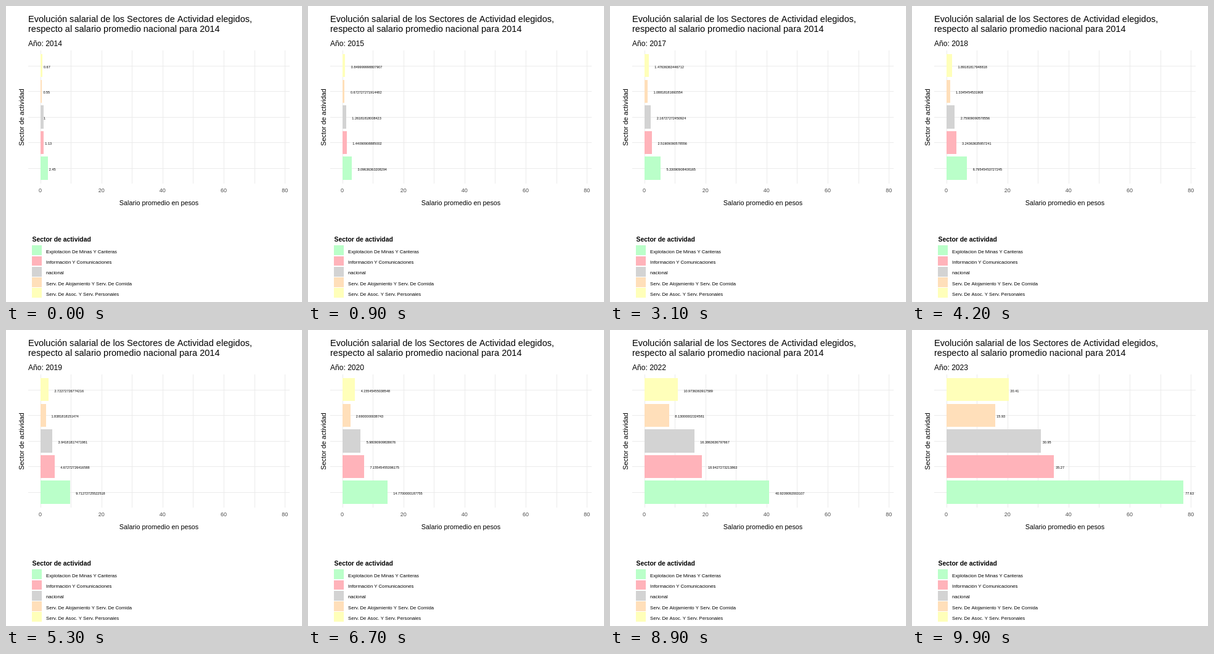
These frames come from a looping animation (480 px wide and 480 px high, 10 s). An HTML page with a canvas:

```html
<!DOCTYPE html>
<html lang="es">
<head>
<meta charset="utf-8">
<style>
html, body { margin: 0; width: 100%; height: 100%; overflow: hidden; background: #fff; }
canvas { display: block; }
</style>
</head>
<body>
<canvas id="stage" width="480" height="480"></canvas>
<script>
const ctx = document.getElementById('stage').getContext('2d');
const FONT = '"Liberation Sans", Arial, sans-serif';
const STEPS = 11, FRAME_MS = 100, FRAMES = 100, FIRST_YEAR = 2014;
const PANEL = { left: 36, top: 72, width: 424, height: 216 };
const ROW = PANEL.height / 5.2;

// National wage index by year; sectors follow it through their pay in three key years
const national = [1, 1.32, 1.75, 2.26, 2.87, 4.18, 5.73, 8.49, 14.93, 30.95];
const MID = 6, LAST = national.length - 1;
const sectors = [
  { name: 'Explotacion De Minas Y Canteras', color: '#baffc9', first: 2.45, mid: 14.14, last: 77.63 },
  { name: 'Información Y Comunicaciones', color: '#ffb3ba', first: 1.13, mid: 6.87, last: 35.27 },
  { name: 'nacional', color: '#d3d3d3', first: national[0], mid: national[MID], last: national[LAST] },
  { name: 'Serv. De Alojamiento Y Serv. De Comida', color: '#ffdfba', first: 0.55, mid: 2.56, last: 15.93 },
  { name: 'Serv. De Asoc. Y Serv. Personales', color: '#ffffba', first: 0.67, mid: 3.99, last: 20.41 }
];

const mix = (a, b, t) => a + t * (b - a);
const xOf = value => 55.55 + value * 4.958;
const yOf = row => PANEL.top - 0.15 + ROW * (4.6 - row);

// Pay in a whole year: the national index times a ratio that drifts between key years
function pay({ first, mid, last }, year) {
  const start = first / national[0], middle = mid / national[MID], end = last / national[LAST];
  const ratio = year < MID
    ? mix(start, middle, year / MID)
    : mix(middle, end, (year - MID) / (LAST - MID));
  return Math.round(100 * ratio * national[year]) / 100;
}

function rect(x, y, w, h, color) {
  ctx.fillStyle = color;
  ctx.fillRect(x, y, w, h);
}

// Rectangle with its top and bottom snapped to whole pixels
function band(x, top, bottom, w, color) {
  const y = Math.round(top);
  rect(x, y, w, Math.round(bottom) - y, color);
}

function text(str, x, y, size, { align = 'left', color = '#000', weight = '' } = {}) {
  ctx.font = `${weight} ${size}px ${FONT}`;
  ctx.textAlign = align;
  ctx.fillStyle = color;
  ctx.fillText(str, x, y);
}

function drawGrid() {
  for (let v = 0; v <= 80; v += 10) {
    rect(Math.round(xOf(v)), PANEL.top, 1, PANEL.height, '#ebebeb');
    if (v % 20 === 0) text(v, xOf(v), 302, 9, { align: 'center', color: '#4d4d4d' });
  }
  sectors.forEach((_, i) => rect(PANEL.left, Math.round(yOf(i)), PANEL.width, 1, '#ebebeb'));
}

function drawTitles(year) {
  text('Evolución salarial de los Sectores de Actividad elegidos,', 36, 26, 14.55);
  text('respecto al salario promedio nacional para 2014', 36, 42, 14.55);
  text('Año: ' + year, 36, 65, 12.06);
  text('Salario promedio en pesos', 248, 323, 10.8, { align: 'center' });
  ctx.save();
  ctx.translate(29, 180.5);
  ctx.rotate(-Math.PI / 2);
  text('Sector de actividad', 0, 0, 10.9, { align: 'center' });
  ctx.restore();
}

function drawLegend() {
  text('Sector de actividad', 42.5, 382, 10.4, { weight: 'bold' });
  sectors.forEach(({ name, color }, i) => {
    const y = 388.3 + 17.28 * i;
    band(42, y, y + 15.84, 16, color);
    text(name, 65, Math.round(y + 12.5), 7.7);
  });
}

function drawBars(frame) {
  const year = Math.floor(frame / STEPS);
  const part = Math.fround(frame % STEPS / STEPS); // single precision shows in the long labels
  ctx.save();
  ctx.beginPath();
  ctx.rect(PANEL.left, PANEL.top, PANEL.width + 1, PANEL.height);
  ctx.clip();
  const values = sectors.map(sector => {
    const from = pay(sector, year);
    return part ? mix(from, pay(sector, year + 1), part) : from;
  });
  const left = Math.round(xOf(0));
  values.forEach((value, i) => {
    const width = Math.round(xOf(value)) - left;
    band(left, yOf(i) - 0.45 * ROW, yOf(i) + 0.45 * ROW, width, sectors[i].color);
  });
  values.forEach((value, i) => {
    const label = String(Number(value.toPrecision(15)));
    ctx.font = `5.5px ${FONT}`;
    const gap = 0.2 * ctx.measureText(label).width;
    text(label, xOf(value) + gap, Math.round(yOf(i) + 3.75), 5.5);
  });
  ctx.restore();
}

function draw(now) {
  const frame = Math.floor(now / FRAME_MS) % FRAMES;
  rect(0, 0, 480, 480, '#fff');
  drawGrid();
  drawTitles(FIRST_YEAR + Math.round(frame / STEPS));
  drawLegend();
  drawBars(frame);
}

const start = performance.now();
function tick() {
  draw(performance.now() - start);
  requestAnimationFrame(tick);
}
tick();
</script>
</body>
</html>
```
